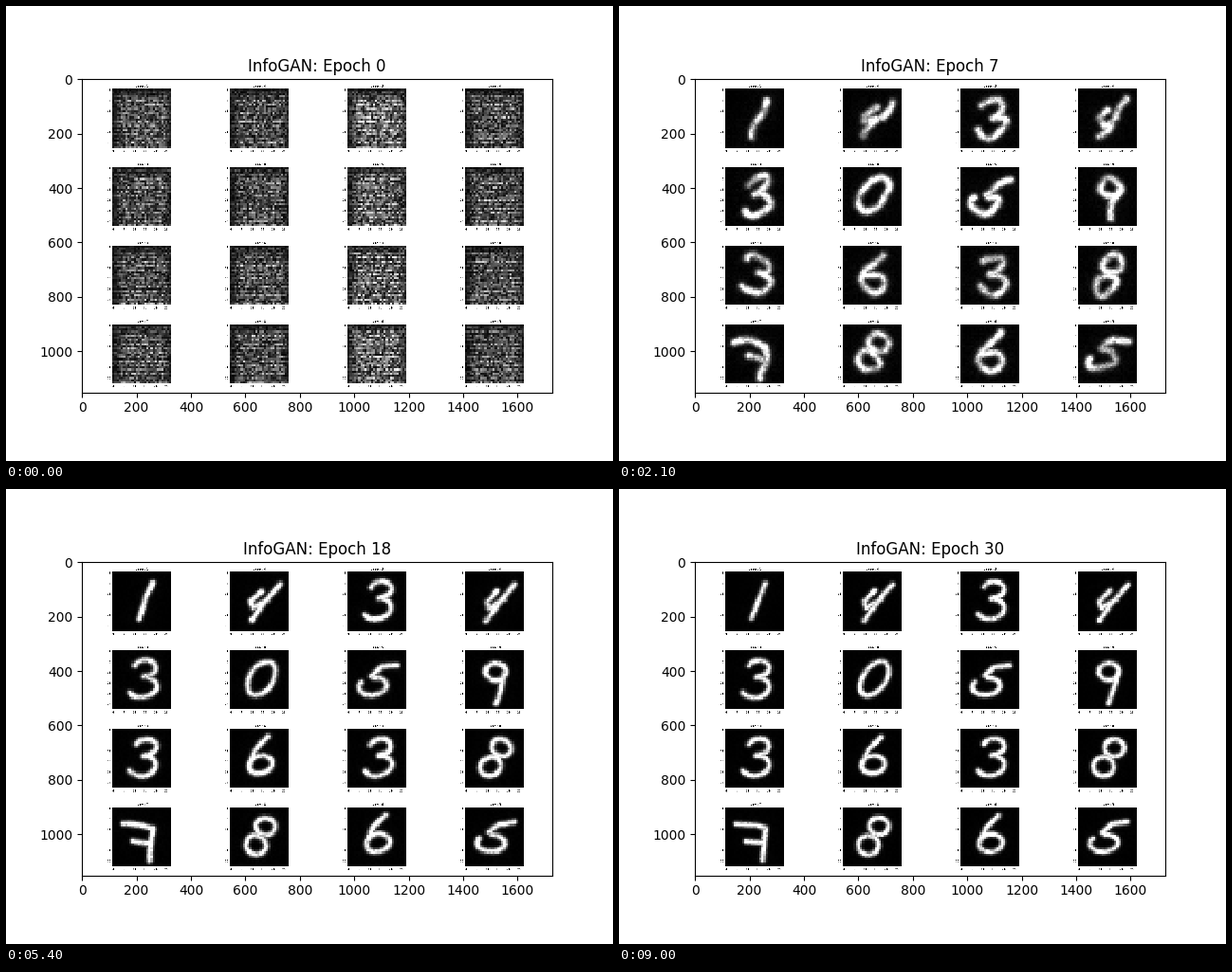
Animation, 640 px wide and 480 px high, one loop 9.3 s. Source, as a matplotlib script:

```python
import numpy as np
import matplotlib.pyplot as plt
from matplotlib.animation import FuncAnimation
from matplotlib.textpath import TextPath

EPOCHS, INTERVAL = 31, 300
LABELS = "1434305936387865"           # 4 x 4 sheet, row by row
N = 28                                # cells per digit side
WIDTH, HEIGHT = 1728, 1152            # sheet size
LEFT, TOP, SIZE = 112, 36, 217
STEP_X, STEP_Y = WIDTH // 4, HEIGHT // 4
ROW, COL = np.mgrid[0:N, 0:N]
CELL = np.arange(SIZE) * N // SIZE


def arc(cx, cy, rx, ry, start=0, end=360):
    a = np.radians(np.linspace(start, end, 60))
    return np.c_[cx + rx * np.cos(a), cy + ry * np.sin(a)]


def line(*pts):
    p = np.array(pts, float)
    t = np.linspace(0, len(p) - 1, 20 * len(p))
    k = np.arange(len(p))
    return np.c_[np.interp(t, k, p[:, 0]), np.interp(t, k, p[:, 1])]


def shape(*strokes, slant=0.0):
    p = np.concatenate(strokes)
    p[:, 0] += slant * (N / 2 - p[:, 1])
    return p


GLYPHS = {
    "0": shape(arc(14.5, 13.3, 6, 8), slant=0.4),
    "1": shape(line((15.5, 5.5), (15.5, 22)), slant=0.4),
    "3": shape(arc(15, 8.5, 5, 3.8, -160, 90),
               arc(14.5, 17.5, 6.5, 4.8, -90, 150), slant=0.1),
    "4": shape(line((23.5, 6), (16.5, 14), (10, 23)),
               line((15, 9), (10, 14), (11, 17), (18, 13))),
    "5": shape(line((22, 7), (15, 8), (11, 12)),
               arc(12.5, 17, 6.5, 4, -90, 210), slant=0.15),
    "6": shape(line((17, 4), (11.5, 10), (9, 17)),
               arc(14.5, 17, 5.5, 4.2), slant=0.1),
    "7": shape(line((5, 8), (14, 8.5), (19, 10), (17.5, 25)),
               line((10, 16), (18, 17))),
    "8": shape(arc(17, 9, 4.5, 4), arc(12, 18, 4.8, 4.5)),
    "9": shape(arc(14.5, 10, 4.8, 4), line((19, 10), (17, 17), (14.5, 25))),
}


def wobble(p, i, epoch):
    """Bend a glyph; the bend drifts and dies away with training."""
    a, b = np.random.default_rng(i).uniform(0, 2 * np.pi, 2)
    amp = 1.9 * np.exp(-max(epoch - 3, 0) / 8)
    return p + amp * np.c_[np.sin(0.35 * p[:, 1] + a + 0.15 * epoch),
                           np.sin(0.35 * p[:, 0] + b + 0.15 * epoch)]


def blotches(rng):
    """Soft random patches, 0 to 1."""
    coarse = np.kron(rng.random((7, 7)), np.ones((4, 4)))
    soft = sum(np.roll(coarse, (a, b), (0, 1))
               for a in (-1, 0, 1) for b in (-1, 0, 1)) / 9
    return np.clip(1.6 * soft - 0.3, 0, 1)


def static_noise(i):
    """Untrained output: horizontal bands, darker at the rim."""
    rng = np.random.default_rng(100 + i)
    bands = rng.uniform(0.7, 1, (N, 1)) * np.where(ROW % 2, 1, 0.6)
    rim = np.clip(0.3 + np.minimum(ROW, np.minimum(COL, N - COL)) / 7, 0, 1)
    gain = 1.15 if i % 4 == 2 else 0.9
    return gain * bands * rim * (0.08 + 0.92 * rng.random((N, N)))


def digit(i, epoch):
    rng = np.random.default_rng([i, epoch])
    p = wobble(GLYPHS[LABELS[i]], i, epoch) - 0.5
    d = np.hypot(COL[..., None] - p[:, 0], ROW[..., None] - p[:, 1]).min(-1)
    early = np.exp(-max(epoch - 3, 0) / 6)
    ink = 1.4 * np.exp(-(d / (1.2 + 0.8 * early)) ** 2)
    ink *= 1.1 - (0.3 + 0.55 * early) * blotches(rng)
    ink *= rng.uniform(0.7, 1.1, (N, N))
    ink += (0.03 + 0.12 * early) * rng.random((N, N)) * np.exp(-d / 6)

    # upsampling grid of the first epochs
    grid = np.clip((7.3 - epoch) / 4, 0, 1) ** 1.5
    lit = (ROW % 2 == 0) & (COL % 4 != 3)
    dots = 0.75 * ((ROW % 4 == 2) & (COL % 4 == 1))
    dots = dots + 0.25 * ((ROW % 4 == 2) & (COL % 4 == 3))
    dots = dots + 0.3 * ((ROW % 2 == 0) & (COL == 1))
    dots = dots * rng.uniform(0.3, 1.1, (N, N))
    return ink * (1 - 0.75 * grid * ~lit) + grid * dots


def tile(i, epoch):
    t = np.interp(epoch, [0, 3], [0, 1])
    return np.clip((1 - t) * static_noise(i) + t * digit(i, epoch), 0, 1)


def stamp(sheet, text, size, x, y, ha="center", va="baseline"):
    """Rasterise small text onto the sheet."""
    path = TextPath((0, 0), str(text), size=size)
    box = path.get_extents()
    x -= {"center": box.x0 + box.width / 2, "right": box.x1}[ha]
    y += {"baseline": 0, "center": box.height / 2, "top": box.height}[va]
    c0, r0 = int(x + box.x0) - 1, int(y - box.y1) - 1
    w, h = int(box.width) + 4, int(box.height) + 4
    sub = (np.arange(3) + 0.5) / 3
    gx = (c0 + np.arange(w)[:, None] + sub).ravel()
    gy = (r0 + np.arange(h)[:, None] + sub).ravel()
    xx, yy = np.meshgrid(gx - x, y - gy)
    inside = path.contains_points(np.c_[xx.ravel(), yy.ravel()])
    cover = inside.reshape(h, 3, w, 3).mean(axis=(1, 3))
    sheet[r0:r0 + h, c0:c0 + w] *= 1 - cover


def corner(i):
    r, c = divmod(i, 4)
    return LEFT + c * STEP_X, TOP + r * STEP_Y


def blank_sheet():
    """White sheet with every tile's title and tick labels."""
    sheet = np.ones((HEIGHT, WIDTH))
    for i, label in enumerate(LABELS):
        x, y = corner(i)
        stamp(sheet, f"Label: {label}", 12, x + SIZE / 2, y - 6)
        for v in range(0, N, 5):
            off = (v + 0.5) * SIZE / N
            stamp(sheet, v, 10, x + off, y + SIZE + 7, va="top")
            stamp(sheet, v, 10, x - 7, y + off, ha="right", va="center")
    return sheet


plt.rcParams["text.kerning_factor"] = 6
fig, ax = plt.subplots(figsize=(6.4, 4.8), dpi=100)
sheet = blank_sheet()
image = ax.imshow(sheet, cmap="gray", vmin=0, vmax=1, interpolation="nearest")
title = ax.set_title("InfoGAN: Epoch 0")


def update(epoch):
    title.set_text(f"InfoGAN: Epoch {epoch}")
    for i in range(len(LABELS)):
        x, y = corner(i)
        sheet[y:y + SIZE, x:x + SIZE] = tile(i, epoch)[np.ix_(CELL, CELL)]
    image.set_data(sheet)
    return [title, image]


anim = FuncAnimation(fig, update, frames=EPOCHS, interval=INTERVAL,
                     repeat=True, repeat_delay=0, blit=False)
plt.show()
```
